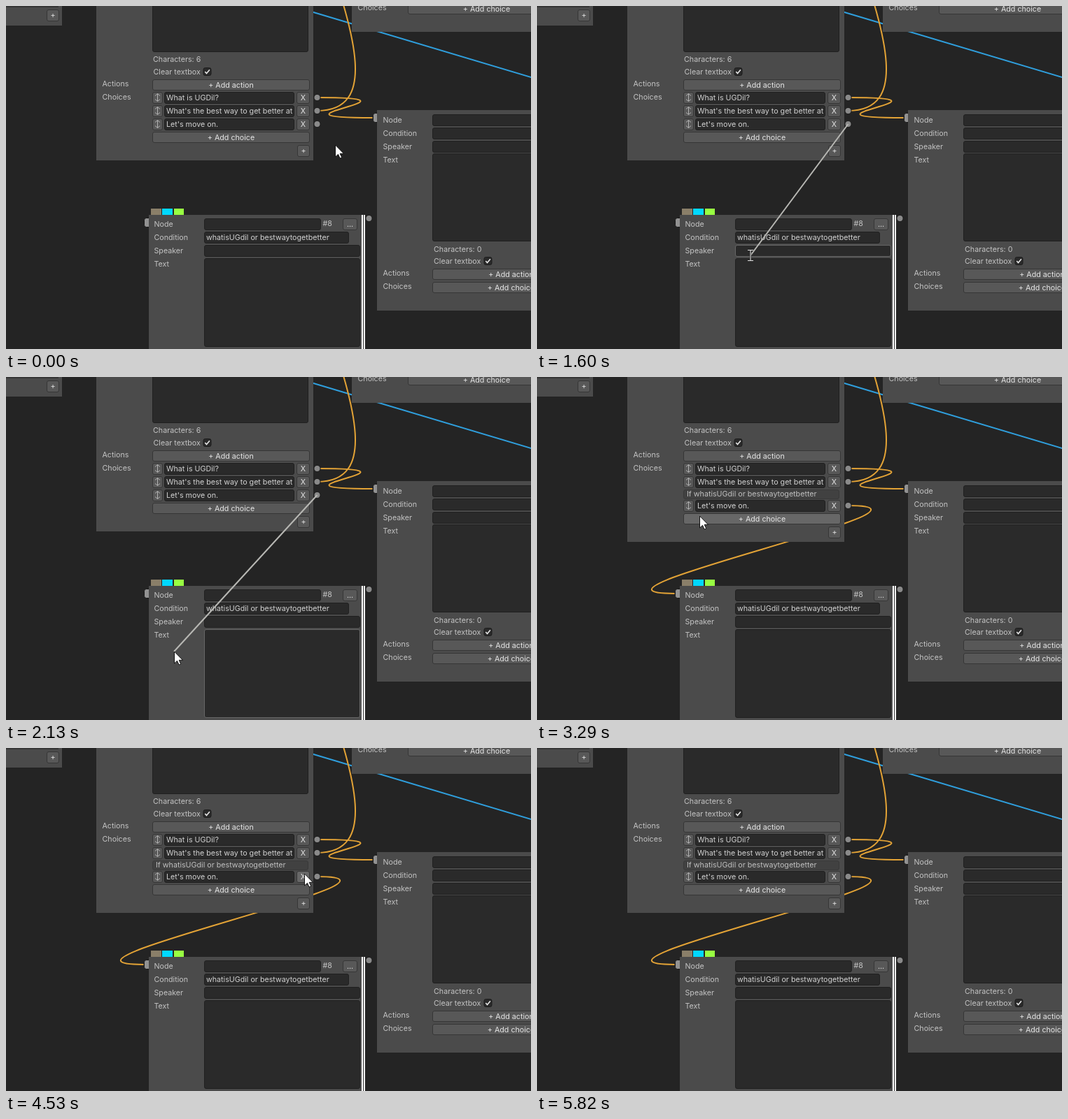
An HTML page with a canvas that plays this animation: 750 by 491 pixels, repeating every 6.46 s.

```html
<!DOCTYPE html>
<html>
<head>
<meta charset="utf-8">
<style>
html, body { margin: 0; width: 100%; height: 100%; overflow: hidden; background: #242424; }
canvas { display: block; }
</style>
</head>
<body>
<canvas id="stage" width="750" height="491"></canvas>
<script>
const c = document.getElementById('stage').getContext('2d');
const LOOP = 6460, GRAB = 1210, DROP = 2590, LEAVE = 3150, GONE = 5820;
const FONT = 'Inter, "Open Sans", sans-serif';
const ORANGE = '#e3a336';

// Pointer path: time, x, y. Two keys at one time make a jump.
const path = [
  [0, 470, 199], [410, 470, 199], [410, 460, 189], [470, 460, 189], [470, 470, 199],
  [700, 470, 199], [900, 449, 169], [1300, 449, 169], [1600, 305, 357], [1620, 305, 357],
  [1830, 286, 371], [1850, 286, 371], [2130, 240, 393], [3140, 240, 393],
  [3290, 232, 199], [3320, 232, 199], [3440, 244, 168], [3770, 244, 168],
  [3930, 470, 151], [4070, 470, 151], [4530, 426, 180], [4640, 426, 180],
  [4720, 390, 185], [5060, 201, 180], [5430, 201, 180], [5430, 202, 181],
  [5570, 202, 181], [5630, 290, 191], [5820, 597, 488]
];
let mouse, overField;

function pointerAt(t) {
  let i = 1;
  while (i < path.length - 1 && path[i][0] <= t) i++;
  const [t0, x0, y0] = path[i - 1], [t1, x1, y1] = path[i];
  const k = Math.min(1, (t - t0) / (t1 - t0));
  return { x: x0 + (x1 - x0) * k, y: y0 + (y1 - y0) * k };
}

function hovered(x, y, w, h) {
  return mouse.x >= x && mouse.x < x + w && mouse.y >= y && mouse.y < y + h;
}

function rect(x, y, w, h, color) {
  c.fillStyle = color;
  c.fillRect(x, y, w, h);
}

function frame(x, y, w, h, fill, edge, r = 2.5) {
  c.beginPath();
  c.roundRect(x + .5, y + .5, w - 1, h - 1, r);
  c.fillStyle = fill;
  c.fill();
  c.strokeStyle = edge;
  c.lineWidth = 1;
  c.stroke();
}

function text(s, x, y, color = '#c4c4c4', align = 'left') {
  c.font = '10.7px ' + FONT;
  c.textAlign = align;
  c.fillStyle = color;
  c.fillText(s, x, y + 3.9);
}

function poly(points, color, width) {
  c.beginPath();
  points.forEach(p => c.lineTo(...p));
  c.strokeStyle = color;
  c.lineWidth = width;
  c.stroke();
}

const panel = (x, y, w, h) => rect(x, y, w, h, '#4b4b4b');

function button(x, y, w, h, s) {
  frame(x, y, w, h, hovered(x, y, w, h) ? '#676767' : '#585858', '#363636');
  text(s, x + w / 2, y + h / 2, '#e6e6e6', 'center');
}

function field(x, y, w, h, s = '', held = false) {
  const over = hovered(x, y, w, h);
  overField = overField || over;
  frame(x, y, w, h, '#2a2a2a', over || held ? '#666' : '#202020');
  if (!s) return;
  c.save();
  c.beginPath();
  c.rect(x + 2, y, w - 4, h);
  c.clip();
  text(s, x + 3, y + h / 2 - .2, '#d2d2d2');
  c.restore();
}

function checkbox(x, y) {
  frame(x - 6, y - 6, 12, 12, '#2a2a2a', '#1c1c1c');
  poly([[x - 3.2, y], [x - 1, y + 2.5], [x + 3.4, y - 2.7]], '#e4e4e4', 1.7);
}

function port(x, y) {
  c.beginPath();
  c.arc(x, y, 4.6, 0, 7);
  c.fillStyle = Math.hypot(mouse.x - x, mouse.y - y) < 6 ? '#dedede' : '#8a8a8a';
  c.fill();
  c.strokeStyle = '#181818';
  c.lineWidth = 1;
  c.stroke();
}

const inlet = (x, y) => frame(x, y, 13, 14, '#929292', '#181818', 3);

function link(x0, y0, x1, y1) {
  const pull = 176;
  c.beginPath();
  c.moveTo(x0, y0);
  c.bezierCurveTo(x0 + pull, y0, x1 - pull, y1, x1, y1);
  c.strokeStyle = ORANGE;
  c.lineWidth = 2;
  c.stroke();
}

function choice(s, y) {
  button(209, y - 8, 15, 17, '');
  for (const d of [-1, 1])
    poly([[213, y + d * 2.5], [216.5, y + d * 5.5], [220, y + d * 2.5]], '#b4b4b4', 1);
  poly([[216.5, y - 5], [216.5, y + 5]], '#b4b4b4', 1);
  field(226, y - 8, 186, 17, s);
  button(415, y - 8, 19, 17, 'X');
}

function choiceNode(linked) {
  const shift = linked ? 15 : 0;
  panel(129, 0, 310, 221 + shift);
  field(209, -20, 223, 86);
  text('Characters: 6', 210, 76.5);
  text('Clear textbox', 210.5, 94);
  checkbox(287.5, 94);
  text('Actions', 137.5, 111);
  button(209, 105, 225, 16, '+ Add action');
  text('Choices', 137.5, 130);
  choice('What is UGDil?', 131);
  choice("What's the best way to get better at", 150);
  if (linked) {
    frame(209, 161, 223, 14, '#414141', '#393939');
    text('If whatisUGdil or bestwaytogetbetter', 214, 167.5, '#bfbfbf');
  }
  choice("Let's move on.", 169 + shift);
  button(209, 180 + shift, 225, 16, '+ Add choice');
  button(416, 199 + shift, 18, 17, '+');
  [131, 150, 169 + shift].forEach(y => port(444.5, y));
}

function labels(x, y) {
  ['Node', 'Condition', 'Speaker', 'Text'].forEach((s, i) => text(s, x, y + i * 19));
}

function conditionNode(held) {
  rect(207, 290, 15, 9, '#8a7f69');
  rect(223, 290, 15, 9, '#00d8ff');
  rect(240, 290, 14, 9, '#98ff42');
  inlet(197, 303);
  panel(204, 299, 304, 192);
  rect(508, 299, 2, 192, '#fff');
  rect(510, 299, 1, 192, '#333');
  rect(511, 299, 2, 192, '#fff');
  port(518.5, 304);
  labels(211.5, 312.5);
  field(283, 304, 167, 17);
  text('#8', 452.5, 311);
  button(481, 304, 21, 17, '...');
  field(283, 323, 207, 17, 'whatisUGdil or bestwaytogetbetter');
  field(283, 342, 223, 17);
  field(283, 361, 223, 127, '', held);
}

function speechNode() {
  inlet(524, 153);
  panel(530, 149, 220, 287);
  labels(538.5, 163);
  [155, 174, 193].forEach(y => field(609, y, 223, 17));
  field(609, 211, 223, 126);
  text('Characters: 0', 611, 348);
  text('Clear textbox', 611, 365);
  checkbox(688.5, 365);
  text('Actions', 538.5, 382);
  button(609, 376, 225, 16, '+ Add action');
  text('Choices', 538.5, 401);
  button(609, 395, 225, 16, '+ Add choice');
}

function edgeNodes() {
  panel(0, 0, 80, 28);
  rect(0, 0, 75, 2, '#363636');
  button(58, 5, 18, 17, '+');
  panel(494, 0, 256, 37);
  text('Choices', 502.5, 2);
  button(574, -4, 225, 16, '+ Add choice');
}

function pointer() {
  const { x, y } = mouse;
  if (overField) {
    const beam = [[[x - 4, y - 7.5], [x + 4, y - 7.5]], [[x, y - 7], [x, y + 7]], [[x - 4, y + 7.5], [x + 4, y + 7.5]]];
    beam.forEach(p => poly(p, '#222', 2.4));
    beam.forEach(p => poly(p, '#dedede', 1.1));
    return;
  }
  c.beginPath();
  [[0, 0], [0, 17], [4, 13.3], [6.6, 19], [9.2, 17.8], [6.7, 12.3], [12, 12.3]]
    .forEach(([dx, dy]) => c.lineTo(x + .5 + dx, y + dy));
  c.closePath();
  c.fillStyle = '#fff';
  c.fill();
  c.strokeStyle = '#111';
  c.lineWidth = 1;
  c.stroke();
}

function draw(t) {
  const linked = t >= DROP;
  mouse = t < GONE ? pointerAt(t) : { x: -99, y: -99 };
  overField = false;
  rect(0, 0, 750, 491, '#242424');
  poly([[436, 8], [752, 102.6]], '#2f9fdd', 2);
  link(444.5, 131, 523.5, 160);
  link(444.5, 150, 474.5, -297);
  if (linked) link(444.5, 184, 196.5, 310);
  edgeNodes();
  choiceNode(linked);
  conditionNode(t >= 1830 && t < LEAVE);
  speechNode();
  if (t > GRAB && !linked) poly([[444.5, 169], [mouse.x, mouse.y]], '#b8b8b4', 2);
  if (t < GONE) pointer();
}

function tick(now) {
  draw(now % LOOP);
  requestAnimationFrame(tick);
}
requestAnimationFrame(tick);
</script>
</body>
</html>
```
